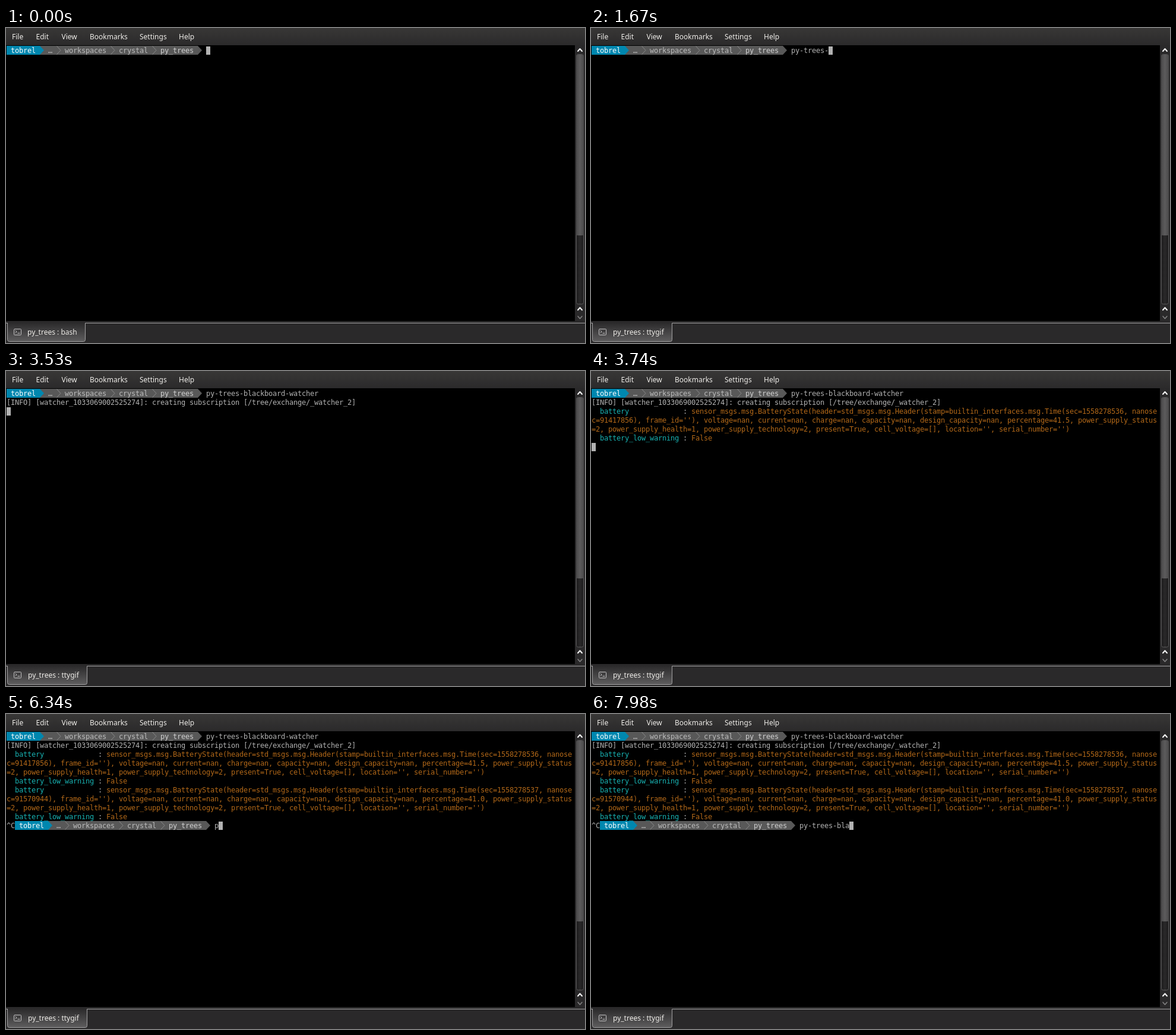
An HTML page for the animation above (8 s loop, 975x530 px).

```html
<!DOCTYPE html>
<html lang="en">
<head>
<meta charset="utf-8">
<title>Terminal</title>
<style>
  html, body { margin: 0; width: 100%; height: 100%; overflow: hidden; background: #2b2a2b; }
  svg { display: block; }
  .ui { font: 12px "Noto Sans", sans-serif; fill: #eeece8; }
  #screen text { font: 12px "DejaVu Sans Mono", monospace; white-space: pre; }
  .stroke { fill: none; stroke-linejoin: round; stroke-linecap: round; }
</style>
</head>
<body>
<svg width="975" height="530" viewBox="0 0 975 530">
  <defs>
    <linearGradient id="bar" x2="0" y2="1">
      <stop stop-color="#383736"/><stop offset="1" stop-color="#2b2a2b"/>
    </linearGradient>
    <linearGradient id="tabFill" x2="0" y2="1">
      <stop stop-color="#2c2b2c"/><stop offset="1" stop-color="#5e5d5e"/>
    </linearGradient>
    <linearGradient id="slider">
      <stop stop-color="#4a494a"/><stop offset=".5" stop-color="#5c5b5c"/><stop offset="1" stop-color="#4a494a"/>
    </linearGradient>
    <linearGradient id="groove">
      <stop stop-color="#1b1a1b"/><stop offset=".5" stop-color="#2a292a"/><stop offset="1" stop-color="#1b1a1b"/>
    </linearGradient>
  </defs>

  <rect width="975" height="530" fill="#2a292a"/>
  <rect width="975" height="29" fill="url(#bar)"/>
  <g id="menu" class="ui"></g>
  <rect y="29" width="958" height="464" fill="#000"/>
  <g id="screen"></g>

  <rect x="960.5" y="44.5" width="12" height="420" rx="3" fill="url(#groove)" stroke="#5a595a"/>
  <rect x="960" y="45" width="13" height="304" rx="3" fill="url(#slider)"/>
  <g class="stroke" stroke="#f2f2f2" stroke-width="2">
    <path d="M963 39l3.5-4 3.5 4M963 474.500l3.500-4 3.500 4"/>
    <path d="M963 485l3.500 4 3.500-4" stroke="#858485" stroke-width="1.500"/>
  </g>

  <path id="tab" fill="url(#tabFill)"/>
  <path id="tabEdge" class="stroke" stroke="#a3a2a3"/>
  <g class="stroke" stroke="#c4c3c4">
    <rect x="13.500" y="506.500" width="12" height="10" rx="1"/>
    <path d="M16 509l2 2-2 2M20 513.500h3"/>
  </g>
  <text id="title" class="ui" y="516"></text>
</svg>

<script>
const LOOP = 8000, CELL = 7, LINE = 15, COLS = 136;
const GREY = '#b2b2b2', TEAL = '#18b2b2', ORANGE = '#b26818';
const BLUE = '#0087af', PATH = '#585858';
const COMMAND = 'py-trees-blackboard-watcher ';
const INFO = '[INFO] [watcher_1033069002525274]: creating subscription [/tree/exchange/_watcher_2]';

const KEYS_1 = [550, 630, 820, 880, 1050, 1110, 1250, 1510, 1670, 1820, 2010, 2080, 2150];
const KEYS_2 = [6340, 6420, 6620, 6720, 6880, 6940, 7080, 7420, 7640, 7750, 7870, 7980];
const AT = { title: 1250, complete: 2330, enter: 3040, info: 3530,
             first: 3740, second: 4740, interrupt: 4940, prompt: 5060 };

const $ = id => document.getElementById(id);
const colX = col => 1 + col * CELL;
const rowY = row => 30 + row * LINE;
const typed = (keys, t) => COMMAND.slice(0, keys.filter(k => t >= k).length);

function put(col, row, str, fill = GREY) {
  const xs = Array.from(str, (_, i) => colX(col + i)).join(' ');
  return `<text x="${xs}" y="${rowY(row) + 12}" fill="${fill}">${str}</text>`;
}

const cursor = (col, row) =>
  `<rect x="${colX(col)}" y="${rowY(row) + 1}" width="7" height="14" fill="${GREY}"/>`;

function prompt(col, row) {
  const y = rowY(row);
  const band = (from, to, fill) => {
    const a = colX(col + from), b = colX(col + to);
    return `<path d="M${a} ${y}H${b}l7 7.5-7 7.5H${a}z" fill="${fill}"/>`;
  };
  const chevron = c =>
    `<path d="M${colX(col + c) + .5} ${y + .5}l6.500 7-6.500 7" fill="none" stroke="#8a8a8a"/>`;
  return band(8, 46, PATH) + band(0, 8, BLUE) + [12, 25, 35].map(chevron).join('') +
    put(col + 1, row, 'tobrel', '#fff') + put(col + 10, row, '…', '#bcbcbc') +
    put(col + 14, row, 'workspaces', '#bcbcbc') + put(col + 27, row, 'crystal', '#bcbcbc') +
    put(col + 37, row, 'py_trees', '#d0d0d0');
}

function report(row, sec, nanosec, percentage) {
  const state = `sensor_msgs.msg.BatteryState(header=std_msgs.msg.Header(stamp=builtin_interfaces.msg.Time(` +
    `sec=${sec}, nanosec=${nanosec}), frame_id=''), voltage=nan, current=nan, charge=nan, capacity=nan, ` +
    `design_capacity=nan, percentage=${percentage}, power_supply_status=2, power_supply_health=1, ` +
    `power_supply_technology=2, present=True, cell_voltage=[], location='', serial_number='')`;
  const room = COLS - 24;
  const label = (name, r) => put(2, r, name, TEAL) + put(22, r, ':');
  let out = label('battery', row) + put(24, row, state.slice(0, room), ORANGE);
  for (let i = room, r = row + 1; i < state.length; i += COLS, r++)
    out += put(0, r, state.slice(i, i + COLS), ORANGE);
  return out + label('battery_low_warning', row + 3) + put(24, row + 3, 'False', ORANGE);
}

function screen(t) {
  const command = t >= AT.complete ? COMMAND : typed(KEYS_1, t);
  let out = prompt(0, 0) + put(48, 0, command);
  if (t < AT.enter) return out + cursor(48 + command.length, 0);
  if (t < AT.info) return out + cursor(0, 1);
  out += put(0, 1, INFO);
  if (t < AT.first) return out + cursor(0, 2);
  out += report(2, 1558278536, 91417856, '41.5');
  if (t < AT.second) return out + cursor(0, 6);
  out += report(6, 1558278537, 91570944, '41.0');
  if (t < AT.interrupt) return out + cursor(0, 10);
  out += put(0, 10, '^C');
  if (t < AT.prompt) return out + cursor(2, 10);
  const next = typed(KEYS_2, t);
  return out + prompt(2, 10) + put(50, 10, next) + cursor(50 + next.length, 10);
}

function drawTab(name, right, x) {
  const body = `M2.5 496.5V524.500q0 3 3 3H${right - 3}q3 0 3-3V496.500`;
  $('tab').setAttribute('d', body + 'z');
  $('tabEdge').setAttribute('d', `M0 496.500H2.500${body}H975`);
  $('title').setAttribute('x', x);
  $('title').textContent = 'py_trees : ' + name;
}

$('menu').innerHTML = [['File', 10], ['Edit', 50.5], ['View', 93.5], ['Bookmarks', 141],
  ['Settings', 225], ['Help', 291]].map(([s, x]) => `<text x="${x}" y="19">${s}</text>`).join('');

const start = performance.now();
let shown;
function frame() {
  const t = (performance.now() - start) % LOOP;
  const markup = screen(t);
  if (markup !== shown) {
    $('screen').innerHTML = shown = markup;
    if (t < AT.title) drawTab('bash', 133.5, 36);
    else drawTab('ttygif', 136.5, 37);
  }
  requestAnimationFrame(frame);
}
frame();
</script>
</body>
</html>
```
